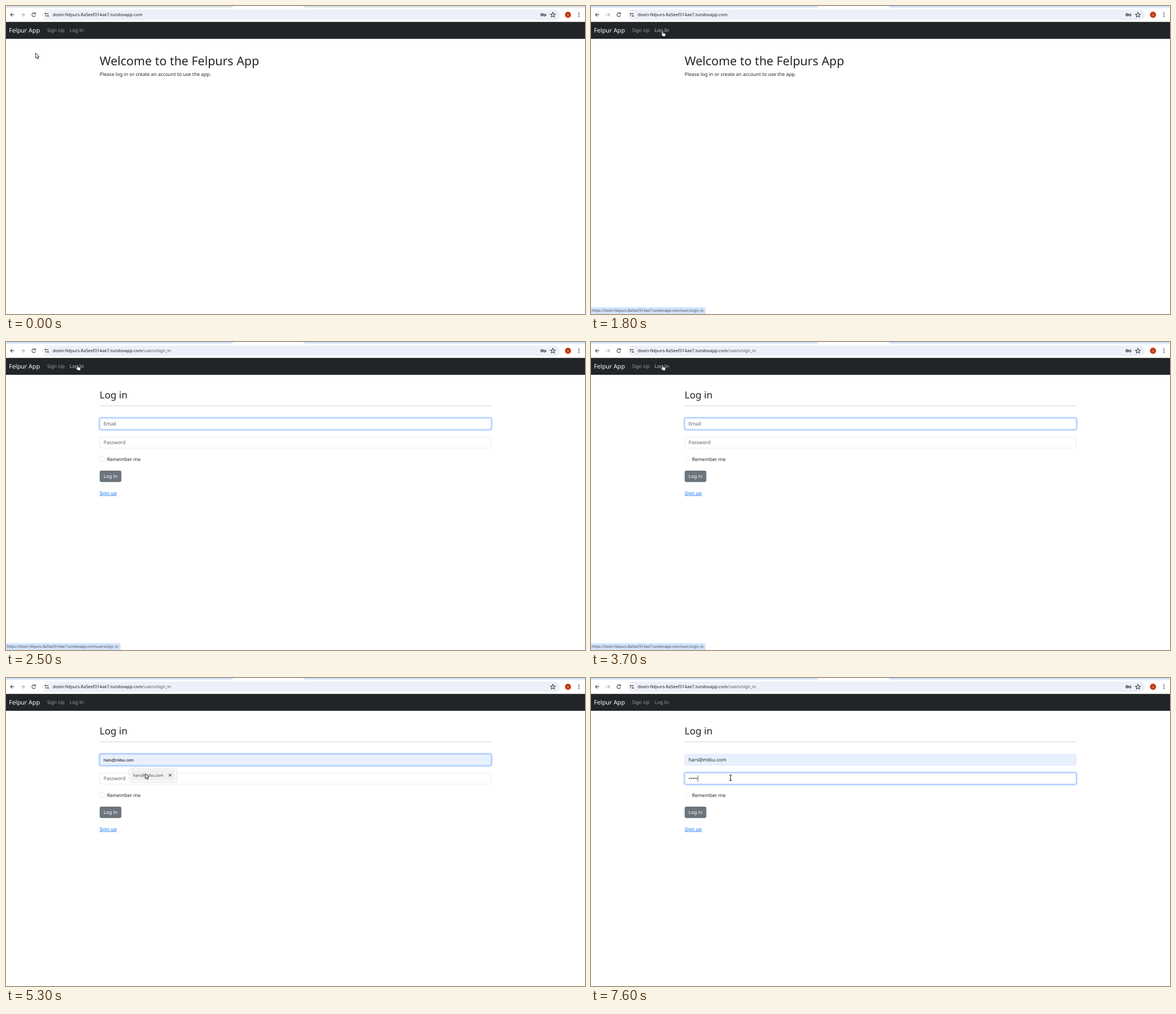
Recreate the animation shown at these times as an HTML page. Size 1025 by 546 pixels, loop 8 s.

```html
<!DOCTYPE html>
<html lang="en">
<head>
<meta charset="utf-8">
<title>Log in</title>
<style>
html, body { margin: 0; height: 100%; overflow: hidden; background: #fff; }
svg { display: block; width: 100%; height: 100%; }
text { font: 8.56px "Noto Sans", sans-serif; fill: #212529; text-rendering: geometricPrecision; white-space: pre; }
.h1 { font-size: 21.4px; }
.h2 { font-size: 17.12px; }
.brand { font-size: 10.7px; fill: #fff; }
.link { fill: #9b9d9e; }
.link.hover { fill: #c8c9ca; }
.hint { fill: #595c5f; }
.url { font-size: 7.66px; fill: #1f1f1f; }
.path { fill: #55585c; }
.small { font-size: 6.43px; fill: #44474c; }
.menu { font-size: 6.83px; fill: #3c4043; }
.plain { font: 7.13px "Liberation Sans", Arial, sans-serif; fill: #000; }
.box { fill: #fff; stroke: #dee2e6; stroke-width: .7; }
.icon { fill: none; stroke: #3c4043; stroke-width: 1.05; }
.popup { filter: drop-shadow(0 .5px 1.3px rgba(0, 0, 0, .35)); fill: #fff; }
</style>
</head>
<body>
<svg viewBox="0 0 1025 546">
  <rect width="1025" height="546" fill="#fff"/>

  <!-- browser bar -->
  <rect id="strip" width="1025" height="3"/>
  <path d="M398 3q4 0 4-3h125q0 3 4 3z" fill="#fff"/>
  <g class="icon">
    <path d="M14.5 15.5h-6.5m3.2-3.2l-3.2 3.2l3.2 3.2"/>
    <path d="M26.5 15.5h6.5m-3.2-3.2l3.2 3.2l-3.2 3.2" stroke="#a9abae"/>
    <path d="M51.8 13.4a3.3 3.3 0 1 0 .5 3.1M52.4 11.7v2.3h-2.4"/>
  </g>
  <rect x="64.5" y="6.3" width="916.5" height="18.3" rx="9.15" fill="#edf0f8"/>
  <circle cx="72.2" cy="15.5" r="6.1" fill="#fff"/>
  <g class="icon" stroke-width=".9">
    <path d="M72 13.6h3.8M68.6 17.5h3.6"/>
    <circle cx="70" cy="13.6" r="1.1"/>
    <circle cx="74.3" cy="17.5" r="1.1"/>
  </g>
  <text class="url" x="82.7" y="18.2">dosin-felpurs-8a5eef314ae7.tundovapp.com<tspan id="path" class="path">/users/sign_in</tspan></text>
  <g id="key" class="icon">
    <circle cx="948.9" cy="15.5" r="2.2"/>
    <circle cx="948.9" cy="15.5" r=".5"/>
    <path d="M951 14.5h4.8v2h-1v1.1h-1.7v-1.1h-2"/>
  </g>
  <path class="icon" stroke-width=".9" d="M968.2 11.2l1.2 2.9l3.1 .3l-2.3 2.1l.7 3.1l-2.7-1.7l-2.7 1.7l.7-3.1l-2.3-2.1l3.1-.3z"/>
  <circle cx="994.9" cy="15.5" r="5.4" fill="#bf360c"/>
  <text x="994.9" y="17.5" text-anchor="middle" style="font-size:5.4px;fill:#f3c9b8">D</text>
  <g fill="#3c4043">
    <circle cx="1014.2" cy="12.2" r=".95"/><circle cx="1014.2" cy="15.5" r=".95"/><circle cx="1014.2" cy="18.8" r=".95"/>
  </g>

  <!-- page header -->
  <rect y="28.2" width="1025" height="30" fill="#212529"/>
  <text class="brand" x="5.3" y="47">Felpur App</text>
  <text id="signUp" class="link" x="72.7" y="46.4">Sign Up</text>
  <text id="logIn" class="link" x="112.7" y="46.4">Log In</text>

  <g id="home">
    <text class="h1" x="165.8" y="104.8">Welcome to the Felpurs App</text>
    <text x="165.8" y="123.6">Please log in or create an account to use the app.</text>
  </g>

  <g id="form">
    <text class="h2" x="165.8" y="100.4">Log in</text>
    <rect x="165.8" y="112.5" width="693.4" height="1.1" fill="#d2d3d4"/>
    <rect id="ring" x="163.7" width="697.6" height="24.5" rx="5" fill="#c2dbfe"/>
    <rect id="emailBox" class="box" x="166" y="135.1" width="693" height="19.8" rx="3.1"/>
    <rect id="passBox" class="box" x="166" y="168.3" width="693" height="19.8" rx="3.1"/>
    <text id="email" x="172.8" y="148.1"></text>
    <text id="pass" x="172.8" y="181.3"></text>
    <rect id="caret" width=".7" height="11.4" fill="#212529"/>
    <rect class="box" x="166.1" y="203.7" width="8" height="8" rx="2"/>
    <text x="178.7" y="210.8">Remember me</text>
    <rect x="165.8" y="228" width="38.4" height="20.3" rx="3.2" fill="#6c757d"/>
    <text x="172.7" y="241.2" style="fill:#fff">Log in</text>
    <text x="165.8" y="270.8" style="fill:#0d6efd" text-decoration="underline">Sign up</text>
  </g>

  <g id="suggest">
    <path class="popup" d="M222 162h4.5l3-4.500l3 4.500h66.500a3 3 0 0 1 3 3v16a3 3 0 0 1-3 3h-77a3 3 0 0 1-3-3v-16a3 3 0 0 1 3-3z"/>
    <rect id="row" x="221" y="163.200" width="79" height="18.600" rx="1.500" fill="#f0f0f1"/>
    <text class="menu" x="225" y="174.800">hars@milsu.com</text>
    <path class="icon" d="M288.300 170l4.400 4.400m0-4.400l-4.400 4.400"/>
  </g>
  <g id="saved">
    <path class="popup" d="M222 194.500h4.500l3-4l3 4h107.500a3 3 0 0 1 3 3v16.500a3 3 0 0 1-3 3h-118a3 3 0 0 1-3-3v-16.500a3 3 0 0 1 3-3z"/>
    <circle cx="230.500" cy="205.500" r="4.300" fill="#4285f4"/>
    <text class="menu" x="242.300" y="208">Use passwords and passkeys saved in your Tolvem Account</text>
  </g>

  <g id="status">
    <path d="M0 534h200.500q2.500 0 2.500 2.500v9.500h-203z" fill="#d3e3fd"/>
    <text class="small" x="1.300" y="542.200">https://dosin-felpurs-8a5eef314ae7.tundovapp.com/users/sign_in</text>
  </g>

  <!-- pointers, drawn from their hot spot -->
  <g id="arrow"><path d="M0 0v8.800l2-1.800l1.500 3.400l1.700-.8l-1.500-3.200h2.900z" fill="#fff" stroke="#111" stroke-width=".9"/></g>
  <g id="hand"><path d="M-.9 0.600q.9-1.200 1.700 0v3l3.300.7q1 .4 .8 1.500l-.5 3.500h-4.300l-2.600-3.500q.2-1.200 1.600-.3z" fill="#fff" stroke="#111" stroke-width=".5"/></g>
  <g id="beam"><path d="M-2-4.800h1.400l.6 .6l.6-.6h1.400M-2 4.800h1.400l.6-.6l.6 .6h1.400M0-4.300v8.600" fill="none" stroke="#222" stroke-width="1.100"/></g>
</svg>
<script>
const LOOP = 8000;
const ui = {};
document.querySelectorAll('[id]').forEach(el => ui[el.id] = el);

const show = (el, on) => el.style.display = on ? '' : 'none';
const count = (t, times) => times.filter(x => t >= x).length;
const within = (t, ...spans) => spans.some(([a, b]) => t >= a && t < b);
const setText = (el, text, cls) => {
  if (el.textContent !== text) el.textContent = text;
  el.setAttribute('class', cls);
};

// Later stops: time, pointer shape, x, y
const stops = [
  [900, 'hand', 127, 44.5], [2400, 'hand', 127, 41],
  [4800, 'arrow', 162.500, 62.500], [5100, 'arrow', 251.500, 119.500],
  [5300, 'arrow', 246.500, 169.500], [5500, 'arrow', 247.500, 169.800],
  [5800, 'beam', 247.700, 177.200], [6300, 'beam', 247.300, 177.400],
  [6600, 'beam', 247.100, 176.800]
];

function pointerAt(t) {
  if (t >= 900) return stops[count(t, stops.map(s => s[0])) - 1].slice(1);
  // The screen refreshes ten times a second.
  const k = Math.max(0, Math.floor(t / 100) - 1) / 8;
  const e = k * k * (3 - 2 * k);
  const x = 52.3 + 74.7 * e, y = 83.5 - 39 * e;
  const onLink = y < 54 && (within(x, [69, 108], [109, 142]));
  return [onLink ? 'hand' : 'arrow', x, y];
}

function drawPointer(t) {
  const [shape, x, y] = pointerAt(t);
  for (const name of ['arrow', 'hand', 'beam']) show(ui[name], name === shape);
  ui[shape].setAttribute('transform', `translate(${x} ${y})`);
  ui.signUp.classList.toggle('hover', shape === 'hand' && x < 109);
  ui.logIn.classList.toggle('hover', t < 5100 && shape !== 'beam' && x >= 109);
}

function drawForm(t) {
  const typed = count(t, [3900, 4100, 4300, 4500]);
  const dots = count(t, [7000, 7200, 7500, 7500, 7600]);
  const filled = t >= 5300, onPass = t >= 6100;

  if (filled) setText(ui.email, 'hars@milsu.com', t < 5800 ? 'plain' : '');
  else setText(ui.email, typed ? 'hars'.slice(0, typed) : 'Email', typed ? '' : 'hint');
  setText(ui.pass, dots ? '•'.repeat(dots) : 'Password', dots ? '' : 'hint');

  ui.ring.setAttribute('y', onPass ? 165.9 : 132.8);
  ui.emailBox.style.fill = filled ? '#e8f0fe' : '';
  ui.emailBox.style.stroke = onPass ? '' : '#86b7fe';
  ui.passBox.style.stroke = onPass ? '#86b7fe' : '';

  const field = onPass ? ui.pass : ui.email;
  const entered = onPass ? dots : typed;
  ui.caret.setAttribute('x', 172.8 + (entered ? field.getComputedTextLength() : 0));
  ui.caret.setAttribute('y', onPass ? 172.4 : 139.3);
  show(ui.caret, within(t, [1900, 2500], [3100, 3700], [3900, 5100], [6100, 6600], [7000, LOOP]));
}

function draw(t) {
  const loggedPage = t >= 1900;
  ui.strip.setAttribute('fill', t < 1800 ? '#dde3ea' : '#d3e3fd');
  show(ui.home, !loggedPage);
  show(ui.form, loggedPage);
  show(ui.path, loggedPage);
  show(ui.key, !within(t, [4100, 7000]));
  show(ui.suggest, within(t, [4100, 5800]));
  show(ui.row, t >= 5300);
  show(ui.saved, within(t, [6100, 7200]));
  show(ui.status, within(t, [1000, 5300]));
  ui.status.style.opacity = t < 1100 ? .5 : 1;
  if (loggedPage) drawForm(t);
  drawPointer(t);
}

const start = performance.now();
function tick() {
  draw((performance.now() - start) % LOOP);
  requestAnimationFrame(tick);
}
tick();
</script>
</body>
</html>
```
